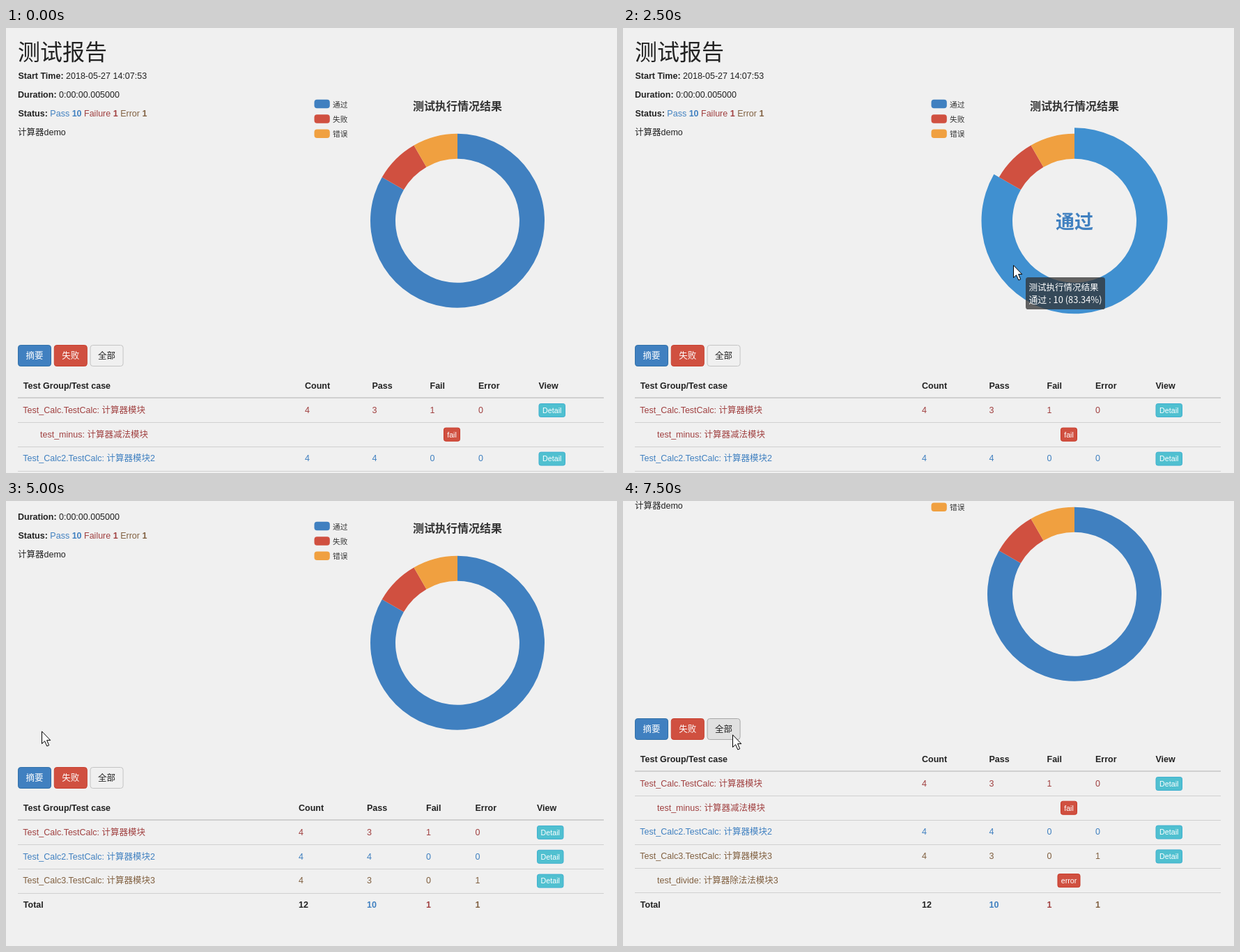
Recreate the animation shown at these times as an HTML page. Size 877 by 639 pixels, loop 8 s.

```html
<!DOCTYPE html>
<html lang="zh">
<head>
<meta charset="utf-8">
<title>测试报告</title>
<style>
html, body { margin: 0; width: 100%; height: 100%; overflow: hidden; background: #f0f0f0; }
svg { display: block; width: 877px; height: 639px; font: 12.5px "Liberation Sans", "Noto Sans CJK SC", "Noto Sans CJK", sans-serif; fill: #222; }
.cjk { font-family: "Noto Sans CJK SC", "Noto Sans CJK", sans-serif; }
.b { font-weight: 700; }
.mid { text-anchor: middle; }
</style>
</head>
<body>
<svg id="stage" viewBox="0 0 877 639"></svg>
<script>
const STEP = 500, BLUE = '#4080c0', RED = '#d05040', ORANGE = '#f0a040';
const MAROON = '#a04040', BROWN = '#806040', CX = 648, CY = 276.8;

const slices = [
  { name: '通过', note: '10 (83.34%)', color: BLUE, lit: '#4090d0', from: 0, to: 300 },
  { name: '失败', note: '1 (8.33%)', color: RED, lit: '#e06050', from: 300, to: 330 },
  { name: '错误', note: '1 (8.33%)', color: ORANGE, lit: '#f8b050', from: 330, to: 360 },
];

const buttons = [
  { label: '摘要', fill: BLUE, line: '#3070a8', ink: '#fff', hotFill: '#3060a0', hotLine: '#205080' },
  { label: '失败', fill: RED, line: '#c84030', ink: '#fff', hotFill: '#c03020', hotLine: '#a02820' },
  { label: '全部', fill: '#f0f0f0', line: '#c4c4c4', ink: '#222', hotFill: '#e0e0e0', hotLine: '#a8a8a8' },
];

const groups = [
  { name: 'Test_Calc.TestCalc: 计算器模块', color: MAROON, nums: [4, 3, 1, 0], sub: 'test_minus: 计算器减法模块', tag: 'fail', tagWidth: 24 },
  { name: 'Test_Calc2.TestCalc: 计算器模块2', color: BLUE, nums: [4, 4, 0, 0] },
  { name: 'Test_Calc3.TestCalc: 计算器模块3', color: BROWN, nums: [4, 3, 0, 1], sub: 'test_divide: 计算器除法法模块3', tag: 'error', tagWidth: 33 },
];

const columns = { open: [429, 525.5, 608.5, 678, 764.5], closed: [420, 518, 603, 673.5, 762] };

// One state per half second: pointer, page scroll, hovered slice or button, tooltip corner
const states = [
  {},
  { at: [370, 252] },
  { at: [562, 196], slice: 1, tip: [580, 214] },
  { at: [618, 168], slice: 2, tip: [636, 186] },
  { at: [722, 198], slice: 0, tip: [689, 201] },
  { at: [560, 340], slice: 0, tip: [578, 358] },
  { at: [556, 208], slice: 1, tip: [574, 226] },
  { at: [234, 437] },
  { at: [100, 353], scroll: 143 },
  { at: [51, 330], scroll: 143, button: 0 },
  { at: [51, 330], scroll: 73, closed: true },
  { at: [78, 394], scroll: 73, closed: true, button: 1 },
  { at: [84, 408], scroll: 73, closed: true, button: 1 },
  { at: [84, 408], scroll: 143 },
  { at: [159, 353], scroll: 143 },
  { at: [157, 335], scroll: 143, button: 2 },
];

const text = (x, y, s, attrs = '') => `<text x="${x}" y="${y}" ${attrs}>${s}</text>`;
const span = (s, color, bold) => `<tspan fill="${color}"${bold ? ' class="b"' : ''}>${s}</tspan>`;
const bold = s => span(s, '#222', true);
const box = (x, y, w, h, r, fill, line = 'none') =>
  `<rect x="${x}" y="${y}" width="${w}" height="${h}" rx="${r}" fill="${fill}" stroke="${line}"/>`;
const rule = (y, h) => `<rect x="17" y="${y}" width="841" height="${h}" fill="#d0d0d0" shape-rendering="crispEdges"/>`;

function badge(x, y, w, label, fill, line) {
  return box(x + .5, y - 9.5, w - 1, 19, 2.7, fill, line) +
    text(x + w / 2, y + 3.8, label, 'class="mid" font-size="10.7" fill="#fff"');
}

function ring(s, hot) {
  const outer = hot ? 133.5 : 125, inner = 89;
  const point = (r, deg) => {
    const a = deg * Math.PI / 180;
    return `${CX + r * Math.sin(a)} ${CY - r * Math.cos(a)}`;
  };
  const big = s.to - s.from > 180 ? 1 : 0;
  return `<path fill="${hot ? s.lit : s.color}" d="M${point(outer, s.from)}A${outer} ${outer} 0 ${big} 1 ${point(outer, s.to)}` +
    `L${point(inner, s.to)}A${inner} ${inner} 0 ${big} 0 ${point(inner, s.from)}Z"/>`;
}

function heading() {
  return text(17, 46.3, '测试报告', 'class="cjk" font-size="32"') +
    text(17.5, 73.3, bold('Start Time:') + ' 2018-05-27 14:07:53') +
    text(17, 100, bold('Duration:') + ' 0:00:00.005000') +
    text(17.5, 126.8, [bold('Status:'), span('Pass', BLUE), span('10', BLUE, true), span('Failure', MAROON),
      span('1', MAROON, true), span('Error', BROWN), span('1', BROWN, true)].join(' ')) +
    text(17, 153.6, '计算器demo');
}

function chart(hover) {
  let out = text(CX, 117.8, '测试执行情况结果', 'class="cjk b mid" font-size="16" fill="#333"');
  slices.forEach((s, i) => {
    const y = 109 + i * 21.4;
    out += box(442.5, y - 6.2, 22.3, 12.5, 4, s.color) +
      text(469, y + 4.5, s.name, 'class="cjk" font-size="10.7" fill="#333"') + ring(s, i === hover);
  });
  const hot = slices[hover];
  return hot ? out + text(CX, 288, hot.name, `class="cjk b mid" font-size="27" fill="${hot.color}"`) : out;
}

function table(closed) {
  const cols = closed ? columns.closed : columns.open;
  const titles = ['Count', 'Pass', 'Fail', 'Error', 'View'];
  let y = 548.4;
  let out = text(24.8, 518.3, 'Test Group/Test case', 'class="b"') +
    titles.map((t, i) => text(cols[i], 518.3, t, 'class="b"')).join('') + rule(530, 2);
  const endRow = () => { out += rule(Math.round(y + 17.6), 1); y += 34.8; };
  for (const g of groups) {
    const ink = `fill="${g.color}"`;
    out += text(24.3, y + 4.3, g.name, ink) + g.nums.map((n, i) => text(cols[i], y + 4.3, n, ink)).join('') +
      badge(cols[4], y + .6, 38.5, 'Detail', '#50c0d0', '#40b0d0');
    endRow();
    if (g.sub && !closed) {
      out += text(49, y + 4.3, g.sub, ink) + badge(640 - g.tagWidth / 2, y + .5, g.tagWidth, g.tag, RED, '#c83828');
      endRow();
    }
  }
  const inks = ['#222', BLUE, MAROON, BROWN];
  return out + text(24.8, y + 4.3, 'Total', 'class="b"') +
    [12, 10, 1, 1].map((n, i) => text(cols[i], y + 4.3, n, `class="b" fill="${inks[i]}"`)).join('');
}

function buttonBar(hover) {
  return buttons.map((b, i) => {
    const x = 17.5 + i * 51.8, hot = i === hover;
    return box(x, 455.5, 47, 30, 3.6, hot ? b.hotFill : b.fill, hot ? b.hotLine : b.line) +
      text(x + 23.5, 475, b.label, `class="cjk mid" fill="${b.ink}"`);
  }).join('');
}

function tooltip([x, y], s) {
  const wide = s === slices[0] ? 114 : 109;
  return box(x, y, wide, 46, 3.6, 'rgba(50,50,50,.75)') +
    text(x + 4.4, y + 18.6, '测试执行情况结果', 'class="cjk" fill="#fff"') +
    text(x + 4.4, y + 37.4, `${s.name} : ${s.note}`, 'class="cjk" font-size="12.9" fill="#fff"');
}

const pointer = ([x, y]) => `<path transform="translate(${x} ${y})" fill="#fff" stroke="#000" ` +
  'd="M.5 .8V18.5L4.6 14.8 7.8 22 10.7 20.8 7.6 13.6H12.8Z"/>';

const stage = document.getElementById('stage');
let shown = -1;

function draw() {
  const step = Math.floor(performance.now() / STEP) % states.length;
  if (step !== shown) {
    shown = step;
    const s = states[step];
    stage.innerHTML = `<g transform="translate(0 ${-(s.scroll || 0)})">` +
      heading() + chart(s.slice) + buttonBar(s.button) + table(s.closed) + '</g>' +
      (s.tip ? tooltip(s.tip, slices[s.slice]) : '') + (s.at ? pointer(s.at) : '');
  }
  requestAnimationFrame(draw);
}
draw();
</script>
</body>
</html>
```
